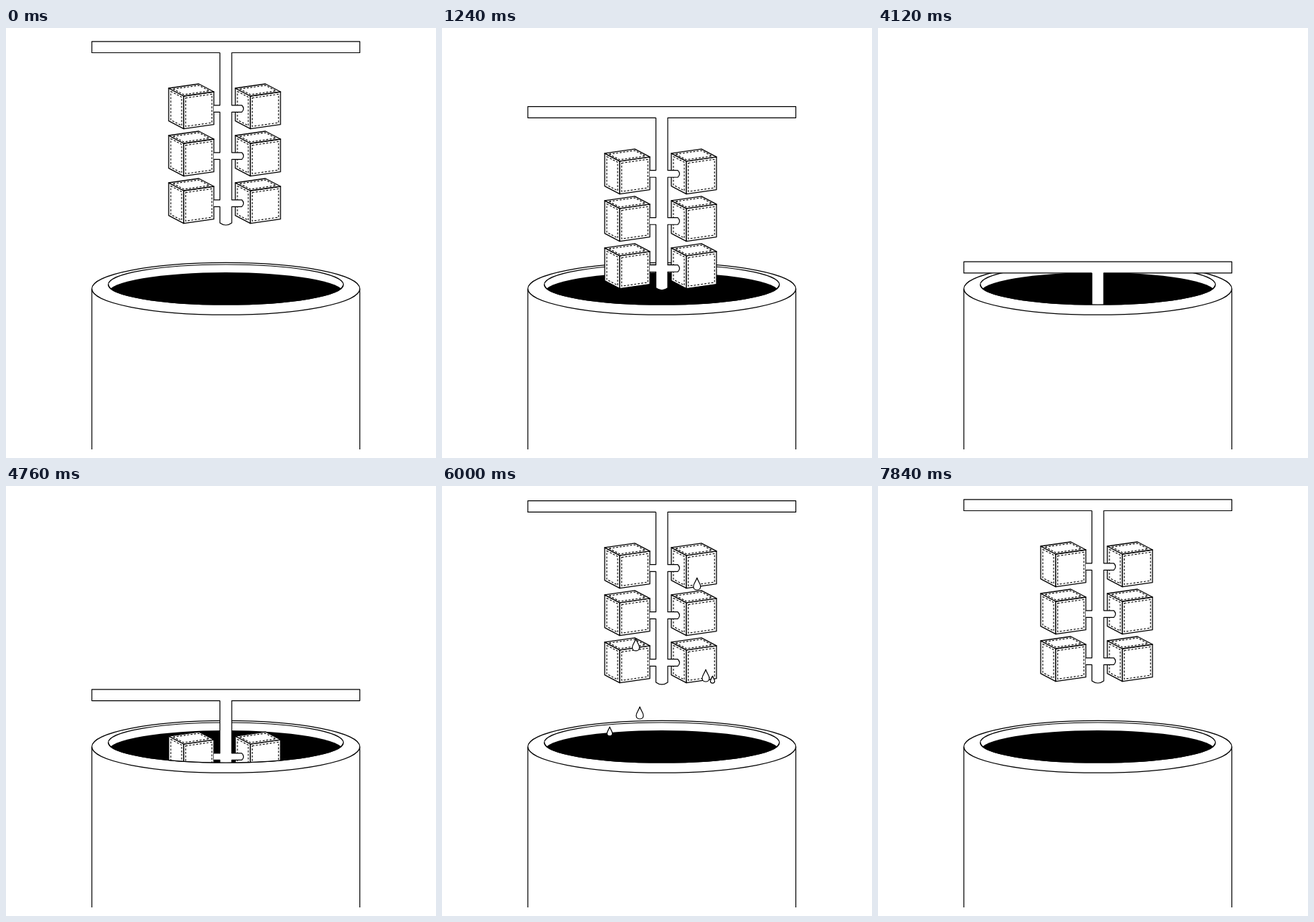
An HTML page with a canvas that plays this animation: 600x600 px, repeating every 9040 ms.

```html
<!DOCTYPE html>
<html lang="en">
<head>
<meta charset="utf-8">
<title>Dipping rack</title>
<style>
  html, body { margin: 0; width: 100%; height: 100%; overflow: hidden; background: #fff; }
  canvas { display: block; width: 600px; height: 600px; }
</style>
</head>
<body>
<canvas id="stage" width="600" height="600"></canvas>
<script>
const ctx = document.getElementById('stage').getContext('2d');
const LOOP = 9040, STEP = 40, DEPTH = 307.5;
const CX = 306.75, RIM = { y: 358, rx: 164, ry: 28 };
const LEFT = 119.8, RIGHT = 493.7;

// x, y on the raised rack, birth time, release time, size
const drops = [
  [270.5, 93.5, 5300, 5594, 1],
  [276, 201.5, 5300, 5620, 1],
  [234, 265.5, 5380, 5700, .75],
  [368, 262.5, 5380, 6342, 1],
  [355.8, 134.5, 5400, 6434, 1],
  [377.5, 268, 5600, 6178, .6],
  [271.5, 272, 6100, 6760, 1],
  [235, 203, 6450, 6820, .8],
  [369, 278, 6450, 6760, .8],
  [241.5, 206.5, 6350, 6910, 1]
];

function ease(x) {
  if (x <= 0) return 0;
  if (x >= 1) return 1;
  let lo = 0, hi = 1, s;
  for (let i = 0; i < 24; i++) {
    s = (lo + hi) / 2;
    const q = 1 - s;
    if (3 * .588 * s * q * q + 3 * .667 * s * s * q + s ** 3 < x) lo = s; else hi = s;
  }
  return s * s * (3 - 2 * s);
}

const sunk = t => DEPTH * (ease((t - 200) / 2200) - ease((t - 4080) / 2010));
const fall = d => d <= 0 ? 0 : d < 300 ? d * d / 1200 : (d - 150) / 4;

function trace(points, close) {
  ctx.beginPath();
  points.forEach(([x, y]) => ctx.lineTo(x, y));
  if (close) ctx.closePath();
}

function paint() {
  ctx.fillStyle = '#fff';
  ctx.fill();
  ctx.stroke();
}

// Parallelogram from p along a and b, with a dashed seam inside
function face([px, py], [ax, ay], [bx, by], u, v) {
  const at = (i, j) => [px + ax * i + bx * j, py + ay * i + by * j];
  const quad = (i, j) => trace([at(i, j), at(1 - i, j), at(1 - i, 1 - j), at(i, 1 - j)], true);
  ctx.lineWidth = 1.3;
  quad(0, 0);
  paint();
  ctx.lineWidth = 1.1;
  ctx.setLineDash([2.8, 2.1]);
  quad(u, v);
  ctx.stroke();
  ctx.setLineDash([]);
}

function cube(x, y) {
  const wide = [42, -6], side = [21, 11], down = [0, 45.7];
  face([x, y], side, down, .14, .065);
  face([x + 21, y + 11], wide, down, .065, .065);
  face([x, y], wide, side, .075, .15);
}

function rack() {
  const rows = [0, 66, 132];
  for (const r of rows) {
    cube(227, 84 + r);
    cube(320, 84 + r);
  }

  // Closed outline for the fill; the arm ends at x = 290 stay unstroked
  const outline = open => {
    ctx.beginPath();
    ctx.moveTo(298.5, 34.5);
    ctx.lineTo(LEFT, 34.5);
    ctx.lineTo(LEFT, 18.8);
    ctx.lineTo(RIGHT, 18.8);
    ctx.lineTo(RIGHT, 34.5);
    ctx.lineTo(315, 34.5);
    for (const r of rows) {
      ctx.lineTo(315, 107.8 + r);
      ctx.lineTo(329, 107.8 + r);
      ctx.quadraticCurveTo(334, 112.6 + r, 329, 117.4 + r);
      ctx.lineTo(315, 117.4 + r);
    }
    ctx.lineTo(315, 272);
    ctx.quadraticCurveTo(306.8, 278, 298.5, 272);
    for (const r of [132, 66, 0]) {
      ctx.lineTo(298.5, 117.4 + r);
      ctx.lineTo(290, 117.4 + r);
      if (open) ctx.moveTo(290, 107.8 + r);
      else ctx.lineTo(290, 107.8 + r);
      ctx.lineTo(298.5, 107.8 + r);
    }
    ctx.lineTo(298.5, 34.5);
  };
  ctx.lineWidth = 1.2;
  ctx.fillStyle = '#fff';
  outline(false);
  ctx.fill();
  outline(true);
  ctx.stroke();
}

function drop([x, y, born, release, size], t) {
  if (t < born) return;
  const s = size * Math.min(1, (t - born) / 400);
  ctx.save();
  ctx.translate(x, y + sunk(Math.min(t, release)) + fall(t - release));
  ctx.scale(s, s);
  ctx.beginPath();
  ctx.moveTo(0, -8.5);
  ctx.bezierCurveTo(1, -4, 5, 0, 5, 3.8);
  ctx.bezierCurveTo(5, 10.2, -5, 10.2, -5, 3.8);
  ctx.bezierCurveTo(-5, 0, -1, -4, 0, -8.5);
  ctx.restore();
  ctx.lineWidth = 1.2;
  paint();
}

function oval(y, rx, ry, end = 2 * Math.PI) {
  ctx.ellipse(CX, y, rx, ry, 0, 0, end);
}

function barrel() {
  ctx.lineWidth = 1.2;
  for (const x of [LEFT, RIGHT]) {
    trace([[x, 588], [x, 364]]);
    ctx.stroke();
  }
  ctx.beginPath();
  oval(363.8, (RIGHT - LEFT) / 2, 36.4);
  paint();
  ctx.beginPath();
  oval(RIM.y, RIM.rx, RIM.ry);
  paint();
  ctx.save();
  ctx.clip();
  ctx.beginPath();
  oval(RIM.y + 11, RIM.rx, RIM.ry);
  ctx.fillStyle = '#000';
  ctx.fill();
  ctx.restore();
}

function draw(t) {
  ctx.fillStyle = '#fff';
  ctx.fillRect(0, 0, 600, 600);
  ctx.strokeStyle = '#000';
  ctx.lineJoin = 'round';
  barrel();

  // Everything that sinks is hidden by the front wall
  ctx.save();
  ctx.beginPath();
  ctx.rect(0, 0, 600, RIM.y);
  ctx.moveTo(CX + RIM.rx, RIM.y);
  oval(RIM.y, RIM.rx, RIM.ry, Math.PI);
  ctx.clip();
  ctx.save();
  ctx.translate(0, sunk(t));
  rack();
  ctx.restore();
  drops.forEach(d => drop(d, t));
  ctx.restore();

  ctx.lineWidth = 1.2;
  ctx.beginPath();
  oval(RIM.y, RIM.rx, RIM.ry, Math.PI);
  ctx.stroke();
}

const start = performance.now();
function tick() {
  const t = (performance.now() - start) % LOOP;
  draw(Math.floor(t / STEP) * STEP);
  requestAnimationFrame(tick);
}
tick();
</script>
</body>
</html>
```
